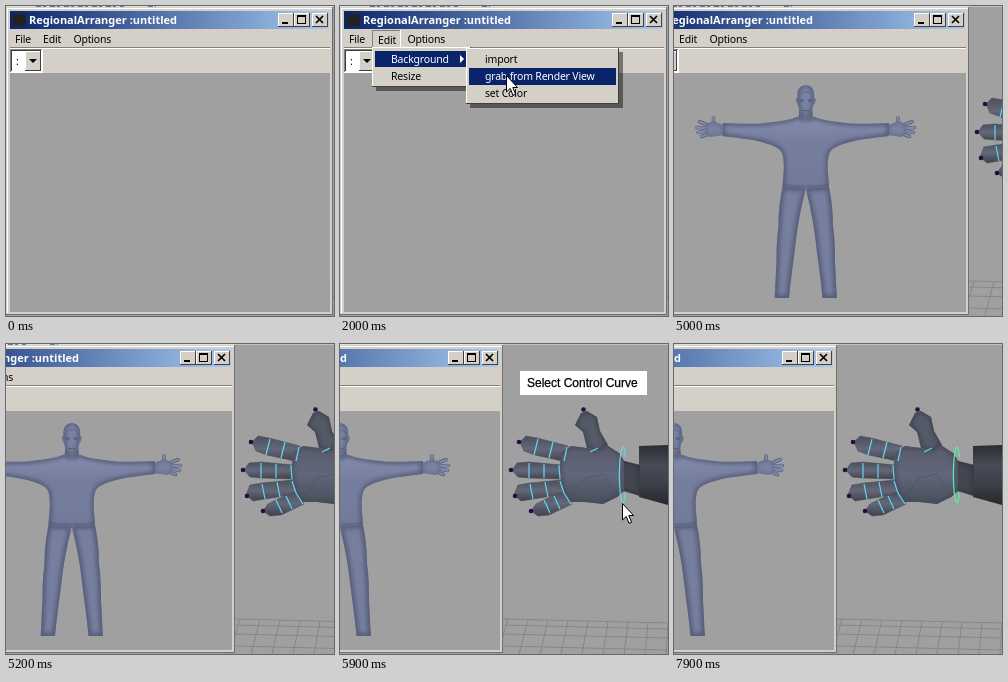
Write an HTML page that moves like this. It is 328 px wide and 310 px high and loops after 8000 ms.

```html
<!DOCTYPE html>
<html lang="en">
<head>
<meta charset="utf-8">
<title>Selector window</title>
<style>
html, body { margin: 0; width: 328px; height: 310px; overflow: hidden; background: #a0a0a0; }
svg { display: block; }
text { font: 10.5px "Noto Sans", "Open Sans", sans-serif; letter-spacing: -.2px; white-space: pre; }
.title { font-weight: 700; font-size: 11px; letter-spacing: 0; fill: #fff; }
.tip { font: 12px "Liberation Sans", Arial, sans-serif; letter-spacing: 0; stroke: #000; stroke-width: .25; }
.lit { fill: #fff; }
.px { shape-rendering: crispEdges; }
.cyan { stroke: #62d6f3; stroke-width: 1.2; fill: none; }
</style>
</head>
<body>
<svg id="stage" width="328" height="310" viewBox="0 0 328 310"></svg>
<script>
const FACE = '#d4d0c8', NAVY = '#0a246a', GRAY = '#a0a0a0';

const rect = (x, y, w, h, fill, more = '') =>
  `<rect class="px" x="${x}" y="${y}" width="${w}" height="${h}" fill="${fill}" ${more}/>`;
const text = (x, y, s, cls = '') => `<text x="${x}" y="${y}" class="${cls}">${s}</text>`;
const poly = (pts, fill, more = '') => `<polygon points="${pts}" fill="${fill}" ${more}/>`;
const path = (d, more) => `<path d="${d}" ${more}/>`;
const dot = (x, y) => `<circle cx="${x}" cy="${y}" r="2.3" fill="#260c40"/>`;
const group = (id, body, more = '') => `<g id="${id}" ${more}>${body}</g>`;

// Box with a light and a dark edge; swap the edges for a sunken look.
const bevel = (x, y, w, h, fill = FACE, light = '#fff', dark = '#404040') =>
  rect(x, y, w, h, dark) + rect(x, y, w - 1, h - 1, light) + rect(x + 1, y + 1, w - 2, h - 2, fill);

// Filled outline with soft dark inner edges.
const solid = (id, d, fill, edge, width = 6) =>
  `<clipPath id="${id}">${path(d, '')}</clipPath>${path(d, `fill="${fill}"`)}
   <g clip-path="url(#${id})">${path(d, `fill="none" stroke="${edge}" stroke-width="${width}" filter="url(#soft)"`)}</g>`;

const ramp = (id, stops, dir = 'x2="0" y2="1"') => `<linearGradient id="${id}" ${dir}>` +
  stops.map((c, i) => `<stop offset="${i / (stops.length - 1)}" stop-color="${c}"/>`).join('') + '</linearGradient>';

const defs = '<defs>' + ramp('bar', [NAVY, '#a6caf0'], '') +
  ramp('sleeve', ['#2b2d33', '#484b56', '#3c3f48', '#26282d']) +
  ramp('finger', ['#4b4f5c', '#636878', '#3f424d']) +
  ramp('palmFill', ['#585c6b', '#61667a', '#4a4e5b']) +
  ramp('shirt', ['#868eb0', '#767e9f', '#757d9e', '#717999']) +
  '<filter id="soft" x="-20%" y="-20%" width="140%" height="140%"><feGaussianBlur stdDeviation="2"/></filter></defs>';

function button(x, glyph) {
  return bevel(x, 7, 16, 14) + `<g class="px" transform="translate(${x} 7)">${glyph}</g>`;
}

function windowFrame() {
  return rect(0, 0, 327, 2, '#e2e0da') +
    path('M30 .5H118M142 .5H150', 'stroke="#5a78b4" stroke-dasharray="5 2 3 4"') +
    rect(0, 1, 327, 308, '#707070') + rect(0, 1, 326, 307, FACE) + rect(1, 2, 325, 1, '#fff') + rect(1, 2, 1, 305, '#fff') +
    rect(4, 5, 319, 18, 'url(#bar)') + rect(7, 8, 13, 12, '#222') +
    text(23, 18, 'RegionalArranger :untitled', 'title') +
    button(272, rect(4, 9, 6, 2, '#000')) +
    button(288, path('M3.5 2.5h8v8h-8zM3 3.5h9', 'fill="none" stroke="#000"')) +
    button(306, path('M4 3l7 7M11 3l-7 7', 'stroke="#000" stroke-width="1.7" shape-rendering="auto"')) +
    text(9, 37, 'File') + text(67.5, 37, 'Options') +
    rect(4, 41, 320, 1, '#808080') + rect(4, 42, 320, 1, '#fff') +
    bevel(4, 43, 33, 24, '#fff', '#808080', '#fff') + rect(5, 44, 30, 1, '#404040') + rect(5, 44, 1, 21, '#404040') +
    text(10, 59, ':') + bevel(19, 45, 16, 20) + poly('23,53 31,53 27,57', '#000') +
    rect(4, 67, 320, 239, GRAY);
}

function figure() {
  const base = '#777f9f', edge = '#555b77';
  const fingers = 'M256 119L256 112M262 119L270 115.5M264 122L272.5 121.5M264 125L271.5 126.5M261 128L267.5 130.5';
  const half =
    solid('leg', 'M164 182 L187 181 C190 196 191 208 191 220 C193 234 193 246 193 257 C194 270 194 282 195 292 L180.5 292 C179 274 176 256 174 238 C172 220 169 203 164.5 186', base, edge) +
    path(fingers, `stroke="${edge}" stroke-width="3.6" stroke-linecap="round"`) +
    path(fingers, 'stroke="#8189a9" stroke-width="2.4" stroke-linecap="round"') +
    solid('hand', 'M246 119 C250 118 253 116 256 115 L264 118 L265 128 L259 131 L246 129Z', '#7a82a2', edge, 2) +
    solid('neck', 'M163 101 L170 101 L171 113 L163 116', '#686f8d', edge, 4) +
    solid('top', 'M163 114 C168 113 170 110 173 111 C180 114 188 115 196 116 C214 119 230 117.5 247 117 L247 130 C232 132 219 133 208 136 C197 139 189 142 187 148 C184 161 187 172 187 182 C179 185 170 184 163 184', 'url(#shirt)', edge, 5) +
    path('M164 180 Q176 181 187 178', `fill="none" stroke="${edge}" opacity=".6"`) +
    path('M171.5 92 q3 -1 1.8 4 q-.7 3 -2.4 3z', 'fill="#6a7190"') +
    solid('head', 'M163 79 C170 79 173 84 172 92 C172 99 170 106 167 109 Q165 111 163 111', '#7a82a2', edge, 4) +
    path('M165.5 94 Q168 92 170.5 94 L169.5 96 Q167 97 165.5 95z', 'fill="#4e5574" opacity=".6"') +
    path('M163 104.5L167 104.5', `stroke="${edge}"`) +
    path('M163 86 Q168 85 171 91', `fill="none" stroke="${edge}" opacity=".6"`);
  return group('half', half) + '<use href="#half" transform="translate(327.5) scale(-1 1)"/>';
}

function grid() {
  let d = '';
  for (const y of [275, 281, 290, 302]) d += `M163 ${y}L328 ${y + 4}`;
  for (let i = 0; i < 9; i++) {
    const x = 168 + i * 20;
    d += `M${x} ${275 + i / 2}L${x + i - 10} 310`;
  }
  return path(d, 'stroke="#868686" stroke-width="1" fill="none"');
}

function viewport() {
  const fingers = [
    ['180,98 186,92 197,94 228,102 227,118 195,111 184,107', 179, 98],
    ['172,126 177,119 189,118 221,121 222,135 189,134 178,133', 171, 126],
    ['174,151 178,141 190,139 221,136 225,150 193,155 181,157', 175, 152],
    ['191,167 196,160 206,155 225,147 232,160 209,171 198,172', 191, 167]
  ];
  const wrist = 'M266 101 L279 109 L284 117 L300 121 L300 152 L284 147 L277 153 L265 158Z';
  const palm = 'M222 108 L231 102 L247 104 L257 107 L267 101 L278 109 L284 118 L284 146 L277 153 L263 160 L245 158 L230 158 L222 143 L219 125Z';
  const thumb = 'M241 69 L247 67 L257 73 L260 87 L268 101 L258 107 L247 104 L243 88 L235 81Z';
  return rect(163, 1, 165, 309, GRAY) + rect(163, 0, 165, 1, '#c4c2bc') + grid() +
    poly('299,102 328,101 328,161 299,153', 'url(#sleeve)') +
    solid('wrist', wrist, '#434650', '#33363e', 4) +
    fingers.map(([p, x, y]) => poly(p, 'url(#finger)', 'stroke="#434652" stroke-width=".5"') + dot(x, y)).join('') +
    solid('palm', palm, 'url(#palmFill)', '#474b58', 4) +
    solid('thumb', thumb, '#555a69', '#3f434e', 4) + dot(243.5, 65.5) +
    path('M263 130L277 152L263 159M263 130L245 134L229 157', 'stroke="#474b58" fill="none" stroke-width=".8" opacity=".6"') +
    path('M198 95L194 111M213 98L209 114M227 103L224 117M189 119V134M204 120V134M219 121L220 135M190 140L193 155M205 138L208 153M220 137L224 149M204 156L210 169M214 152L220 165M224 149L231 160M250 108L258 104', 'class="cyan"');
}

function menus() {
  const shade = 'fill-opacity=".45"';
  const edit = rect(36, 45, 99, 40, '#000', shade) + bevel(32, 41, 99, 40) +
    bevel(32, 24, 29, 18, FACE, '#808080', '#fff') + text(38, 38, 'Edit') +
    rect(35, 45, 93, 16, NAVY) + text(51, 57, 'Background', 'lit') +
    poly('120,49 124,53 120,57', '#fff') + text(51, 74, 'Resize');
  const sub = rect(130, 46, 153, 56, '#000', shade) + bevel(126, 42, 153, 56) +
    rect(129, 62, 147, 17, NAVY) + text(145, 57, 'import') +
    text(145, 74, 'grab from Render View', 'lit') + text(145, 91, 'set Color');
  return group('edit', edit) + group('sub', sub);
}

// The wrist hides the middle of the ring's far side.
const ring = (id, color) => group(id,
  path('M285.3 113C284.5 98 280 98 279.3 131C280 164 284.5 164 285.3 149', `fill="none" stroke="${color}" stroke-width="1.2"`));

document.getElementById('stage').innerHTML = defs +
  group('scene',
    `<g transform="translate(164)">${viewport()}${ring('idle', '#62d6f3')}${ring('picked', '#4df5a2')}</g>` +
    windowFrame() + group('editLabel', text(37, 37, 'Edit')) + group('man', figure()) + menus()) +
  group('tip', rect(180, 27, 127, 24, '#fff') + text(187, 43, 'Select Control Curve', 'tip')) +
  group('cursor', poly('.5,.5 .5,17 4.3,13.4 7,20.3 9.6,19.3 6.8,12.5 11.5,12.5', '#fff', 'stroke="#000" stroke-width="1"'));

// [start, pan, cursor position or null, visible parts]
const steps = [
  [0, 0, null, 'editLabel idle'],
  [1000, 0, [46, 33], 'editLabel idle'],
  [1500, 0, [106, 50], 'edit idle'],
  [2000, 0, [166, 69], 'edit sub idle'],
  [3000, 0, null, 'editLabel man idle'],
  [5000, -32, null, 'editLabel man idle'],
  [5200, -98, null, 'editLabel man idle'],
  [5400, -164, null, 'editLabel man idle'],
  [5900, -164, [282, 159], 'editLabel man idle tip'],
  [6900, -164, [282, 159], 'editLabel man picked tip'],
  [7900, -164, null, 'editLabel man picked']
];
const LOOP = 8000;
const parts = ['editLabel', 'edit', 'sub', 'man', 'idle', 'picked', 'tip'];
const el = id => document.getElementById(id);
const show = (id, on) => { el(id).style.display = on ? '' : 'none'; };
const t0 = performance.now();
let last = null;

function draw() {
  const t = Math.max(0, performance.now() - t0) % LOOP;
  const step = steps.findLast(s => s[0] <= t);
  if (step !== last) {
    const [, pan, at, visible] = last = step;
    const on = visible.split(' ');
    parts.forEach(id => show(id, on.includes(id)));
    el('scene').setAttribute('transform', `translate(${pan})`);
    show('cursor', at);
    if (at) el('cursor').setAttribute('transform', `translate(${at})`);
  }
  requestAnimationFrame(draw);
}
draw();
</script>
</body>
</html>
```
